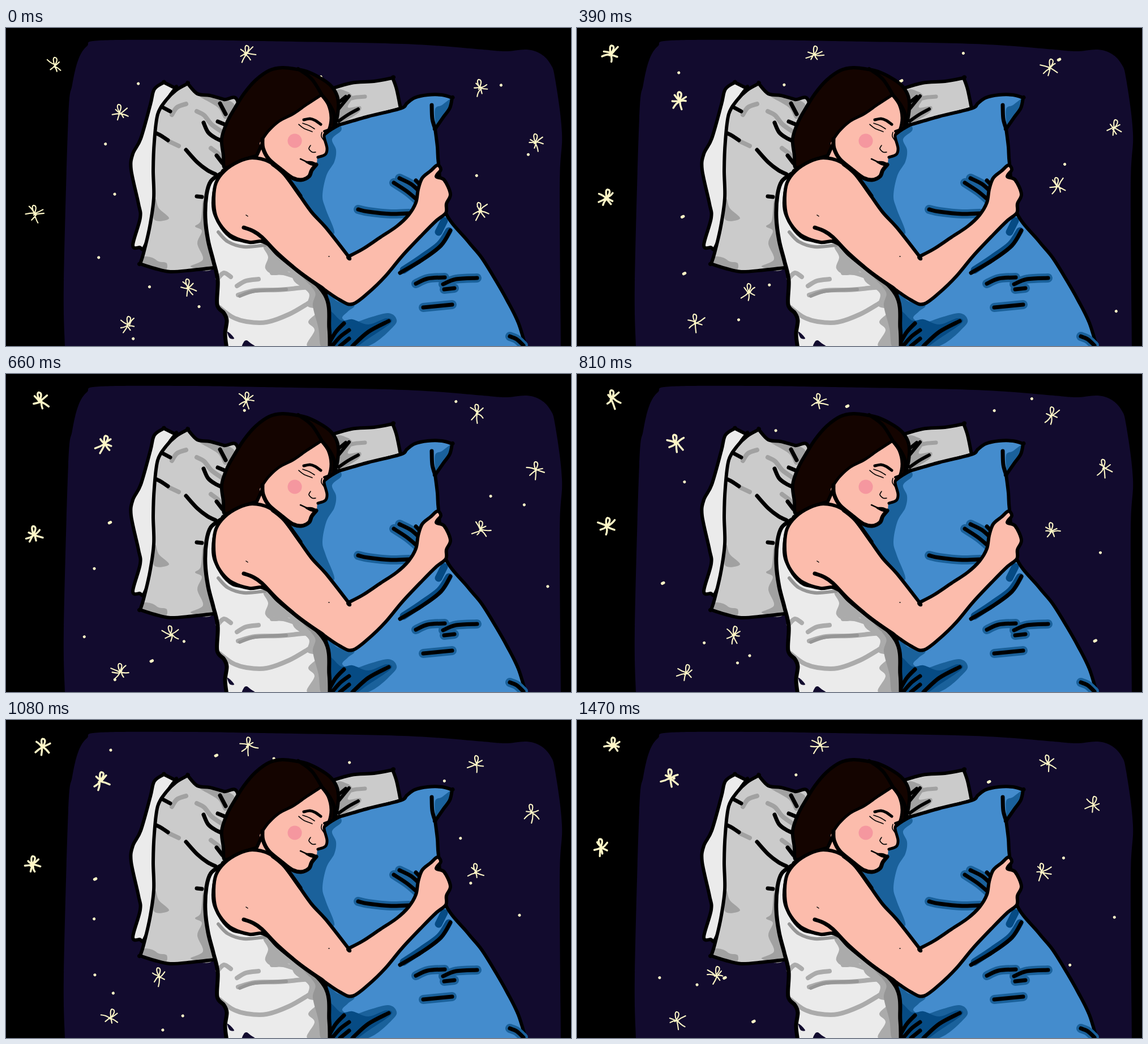
Recreate the animation shown at these times as an HTML page. Size 998 px wide and 561 px high, loop 1500 ms.

```html
<!DOCTYPE html>
<html lang="en">
<head>
<meta charset="utf-8">
<title>Sleeping under stars</title>
<style>
  html, body { margin: 0; width: 100%; height: 100%; overflow: hidden; background: #000; }
  svg { display: block; width: 100%; height: 100%; stroke-linecap: round; stroke-linejoin: round; fill: none; }
</style>
</head>
<body>
<svg viewBox="0 0 998 561"></svg>
<script>
const svg = document.querySelector('svg');
const INK = '#000', NIGHT = '#120b2e', SKIN = '#fcbcac', HAIR = '#140400', STAR = '#fdf6c6';
const BLUE = '#448ccd', SHADE = '#1a619b', DEEP = '#064b84';
const LINEN = '#cbcbcb', FOLD = '#a1a1a1', WHITE = '#ebebeb', CREASE = '#ababab', DARK = '#969696';

// Smooth curve through points; a repeated point makes a corner.
function curve(text, closed) {
  const p = text.split(' ').map(pair => pair.split(',').map(Number)), n = p.length;
  const at = i => closed ? p[(i + n) % n] : p[Math.max(0, Math.min(n - 1, i))];
  let d = 'M' + p[0];
  for (let i = 0; i < (closed ? n : n - 1); i++) {
    const [a, b, c, e] = [at(i - 1), at(i), at(i + 1), at(i + 2)];
    d += `C${b.map((v, k) => v + (c[k] - a[k]) / 6)} ${c.map((v, k) => v - (e[k] - b[k]) / 6)} ${c}`;
  }
  return closed ? d + 'Z' : d;
}

function add(attrs) {
  const el = document.createElementNS('http://www.w3.org/2000/svg', 'path');
  for (const k in attrs) el.setAttribute(k, attrs[k]);
  return svg.appendChild(el);
}
const fill = (color, ...shapes) => shapes.forEach(s => add({ d: curve(s, true), fill: color }));
const line = (width, color, ...paths) =>
  add({ d: paths.map(p => curve(p)).join(''), stroke: color, 'stroke-width': width });

// Filled shape whose outline goes on top of its shading.
function outlined(width, color, text, shading = () => {}) {
  fill(color, text);
  shading();
  add({ d: curve(text, true), stroke: INK, 'stroke-width': width });
}
// Pen strokes with a soft shadow beneath.
function shaded(...paths) {
  line(16, SHADE, ...paths);
  line(7, INK, ...paths);
}

// Night sky
fill(NIGHT, '104,562 104,562 102,450 110,160 117,100 128,55 143,32 165,22 320,21 450,23 700,28 830,37 880,41 920,38 945,46 962,64 970,90 982,185 978,280 980,562 980,562');
const thinStars = add({ stroke: STAR, 'stroke-width': 2.1 });
const boldStars = add({ stroke: STAR, 'stroke-width': 3.4 });
const dots = add({ stroke: STAR, 'stroke-width': 5 });

// Pillows
outlined(6, LINEN, '572,108 572,108 610,97 650,94 683,88 683,88 690,108 697,142 697,142 640,158 575,178', () => {
  fill(FOLD, '583,112 602,112 612,122 604,140 626,138 622,150 590,168 583,160');
  line(7, FOLD, '606,125 620,122 634,121');
});
line(6, INK, '588,142 606,120', '588,131 600,121', '588,164 604,153 622,143');

outlined(6, WHITE, '279,96 279,96 262,108 255,135 238,195 224,222 221,250 234,310 237,335 224,383 236,387 246,383 275,300 280,150 299,106 299,106');
outlined(6, LINEN, '321,98 321,98 300,110 283,127 268,152 262,200 260,250 261,300 254,350 243,397 237,416 237,416 262,424 290,430 330,427 375,422 375,422 365,300 410,240 410,132 385,126 360,119 338,116', () => {
  fill(FOLD,
    '342,120 372,122 402,133 398,150 386,160 374,140',
    '264,302 270,318 288,336 262,338',
    '242,404 258,405 270,412 284,415 279,428 240,417',
    '348,304 352,345 365,423 326,421 348,408 338,380 346,358 334,350 344,340');
  line(8, FOLD, '293,153 302,140 318,134', '337,147 350,154 363,170 383,184', '288,200 305,208',
    '362,212 375,222 382,232');
});
line(7, INK, '275,139 290,147', '266,186 274,190 286,198', '349,167 357,184 370,194 383,200',
  '318,215 338,237 356,251 370,258', '378,133 388,152', '374,165 386,170', '372,225 382,238', '337,297 346,298');

// Blue duvet
outlined(6, BLUE, '500,250 560,190 588,171 588,171 640,156 697,142 708,133 722,123 745,118 770,118 788,123 788,123 784,141 772,158 758,178 758,178 762,210 764,240 775,322 815,375 840,405 865,445 885,480 905,520 919,566 919,566 565,566 565,566 565,470 520,330', () => {
  fill(SHADE,
    '500,262 545,225 565,190 588,173 592,181 576,196 583,215 580,236 566,260 559,296 565,320 580,362 552,352 520,302',
    '758,143 770,136 786,125 782,141 770,158 760,172',
    '560,462 585,482 615,489 604,500 594,512 612,520 645,510 675,503 689,512 684,527 640,561 570,570');
  fill(DEEP, '568,500 592,516 612,514 640,523 672,512 680,520 640,548 610,566 570,566');
  line(13, DEEP, '774,340 764,360', '782,358 766,382 735,405 702,427');
});
shaded('622,320 640,324 680,328 712,327', '685,273 708,288 726,303', '695,265 715,275 730,288');
shaded('724,451 745,442 775,440', '772,452 795,443 832,441', '774,461 792,459', '737,493 788,488', '890,544 902,549 914,560');
line(7, INK, '752,136 753,160 758,178', '724,269 731,276', '696,432 735,409 768,384 785,357',
  '612,561 640,536 676,517', '568,561 582,537 597,521', '576,561 590,545 606,533', '590,561 606,548');

// Shirt
outlined(7, WHITE, '382,255 382,255 362,270 354,295 352,335 357,375 366,410 374,445 373,488 385,503 390,516 387,540 390,566 390,566 572,566 572,566 571,530 563,470 500,410 455,377 400,370 370,330 368,290', () => {
  fill(CREASE, '455,386 475,386 520,430 562,466 571,561 532,561 545,533 534,518 552,498 532,490 535,468 510,448 500,430 475,436 458,424 463,404');
  fill(DARK, '525,440 560,464 568,500 570,561 556,561 552,530 542,490 546,466');
  line(8, CREASE, '374,442 385,432 397,439', '408,455 424,446 446,443', '410,471 440,463 480,462 535,457',
    '377,493 400,510 425,518 460,519 500,505 535,485', '470,432 490,432 515,440');
  line(6, DARK, '413,473 440,464 495,461', '375,360 392,377 420,386 458,383', '482,397 520,431 555,456');
});
fill(NIGHT, '418,565 420,554 425,551 432,556 443,565', '391,536 398,541 403,548 395,547');

// Head
outlined(6, HAIR, '488,70 465,75 441,92 421,115 405,140 391,165 381,195 384,225 386,246 404,240 430,229 452,224 480,225 540,180 575,178 583,165 587,140 585,120 575,103 560,91 535,78 515,73');
fill(SKIN,
  '452,200 448,215 441,229 465,238 490,256 512,262 490,215',
  '557,118 557,118 531,135 508,151 483,164 464,181 453,196 453,212 464,232 484,248 505,264 520,268 535,262 548,241 551,228 564,223 567,212 561,186 573,176 574,160 571,140');
line(5, INK, '557,118 531,135 508,151 483,164 464,181 453,196', '557,118 569,135 574,158 570,180 562,190 567,212 564,223 551,228');
line(7, INK, '453,196 454,212 464,231 484,248 505,264 521,268 535,262 540,251 548,241');
line(6, INK, '452,205 442,227', '558,118 572,136 580,154 579,174', '516,72 540,90 558,118');
line(5, INK, '526,162 537,160 546,163 556,170');
line(1.6, INK, '517,170 526,177 541,183', '524,168 535,172 545,178', '538,207 535,213 541,219 547,219',
  '558,184 557,191 562,199');
line(4, INK, '562,182 570,179');
line(2.5, INK, '520,231 531,236 545,240');
fill(INK, '528,236 540,235 548,239 541,243');
line(25, '#f5979f', '510,199 510.1,199');

// Shoulder, arm and hand
outlined(6, SKIN, '435,229 410,236 386,252 371,273 367,300 370,330 382,352 400,368 430,378 457,377 480,400 520,432 560,460 590,480 612,487 640,467 670,438 700,402 735,365 760,340 777,326 778,310 785,293 774,268 760,262 768,250 762,242 750,252 735,265 728,285 724,308 711,330 690,350 660,370 630,390 605,403 605,403 565,352 540,325 515,290 490,256 465,236');
line(7, INK, '420,352 436,358 452,369 480,398 520,432 560,460', '471,240 492,258 520,296');
line(1.5, INK, '424,330 427,332', '570,403 571,403');

// Each star drifts from a start over a midway point to an end.
const STEP = 30, LAST = 49, MID = 13;
const stars = [
  [[87, 67], [60, 46], [64, 46]],
  [[202, 150], [182, 128], [165, 102]],
  [[52, 328], [53, 300], [43, 225]],
  [[425, 46], [419, 47], [430, 45]],
  [[838, 106], [836, 70], [833, 77]],
  [[936, 202], [949, 177], [912, 150]],
  [[838, 323], [849, 279], [822, 268]],
  [[322, 458], [304, 466], [246, 450]],
  [[216, 524], [210, 520], [176, 530]]
];
// Areas of open sky for the dots: x, y, width, height, count.
const patches = [[135, 190, 65, 280, 3], [160, 42, 740, 70, 5], [180, 445, 170, 105, 3], [800, 130, 160, 390, 4]];

// Repeatable random number in 0..1
function random(a, b, c) {
  const v = Math.sin(a * 127.1 + b * 311.7 + c * 74.7) * 43758.5453;
  return v - Math.floor(v);
}

function starPath(x, y, id, step) {
  const n = i => 2 * random(id + 1, step + 1, i) - 1;
  const pt = (dx, dy) => `${(x + dx).toFixed(1)} ${(y + dy).toFixed(1)} `;
  const arms = 6 + (n(0) > 0), lean = n(1) * 3;
  let d = 'M' + pt(0, 0) + 'C' + pt(lean - 4, -7) + pt(lean - 4, -16) + pt(lean, -15)
    + 'C' + pt(lean + 6, -14) + pt(lean + 3, -5) + pt(-3, 2);
  for (let i = 1; i < arms; i++) {
    const angle = (i / arms - .25) * 2 * Math.PI + n(i + 2) * .3, r = 14 + n(i + 10) * 4.5;
    const cos = Math.cos(angle) * r, sin = Math.sin(angle) * r, bend = n(i + 20) * .15;
    d += 'M' + pt(n(i + 30) * 2, n(i + 40) * 2)
      + 'Q' + pt(cos / 2 - sin * bend, sin / 2 + cos * bend) + pt(cos, sin);
  }
  return d;
}

function draw(step) {
  const late = step >= MID ? 1 : 0;
  const mix = late ? (step - MID) / (LAST - MID) : step / MID;
  const wobble = 5 * Math.sin(Math.PI * mix);
  let thin = '', bold = '', dust = '';
  stars.forEach((path, id) => {
    const [x, y] = path[late].map((v, axis) =>
      v + (path[late + 1][axis] - v) * mix + wobble * (2 * random(id, step, axis + 50) - 1));
    const glyph = starPath(x, y, id, step);
    if (id < 3 && step > 6) bold += glyph;
    else thin += glyph;
  });
  patches.forEach(([x, y, w, h, count], patch) => {
    for (let i = 0; i < count; i++) {
      const r = k => random(patch * 10 + i, step + 1, k);
      if (r(60) > .8) continue;
      // Spread along the longer side, one dot per share.
      const along = (i + r(61)) / count, across = r(62), wide = w > h;
      const px = x + w * (wide ? along : across), py = y + h * (wide ? across : along);
      const length = r(63) > .8 ? 2.5 : .01;
      dust += `M${px} ${py}l${length} ${-length / 2}`;
    }
  });
  thinStars.setAttribute('d', thin);
  boldStars.setAttribute('d', bold);
  dots.setAttribute('d', dust);
}

function tick() {
  draw(Math.floor(performance.now() / STEP) % (LAST + 1));
  requestAnimationFrame(tick);
}
tick();
</script>
</body>
</html>
```
